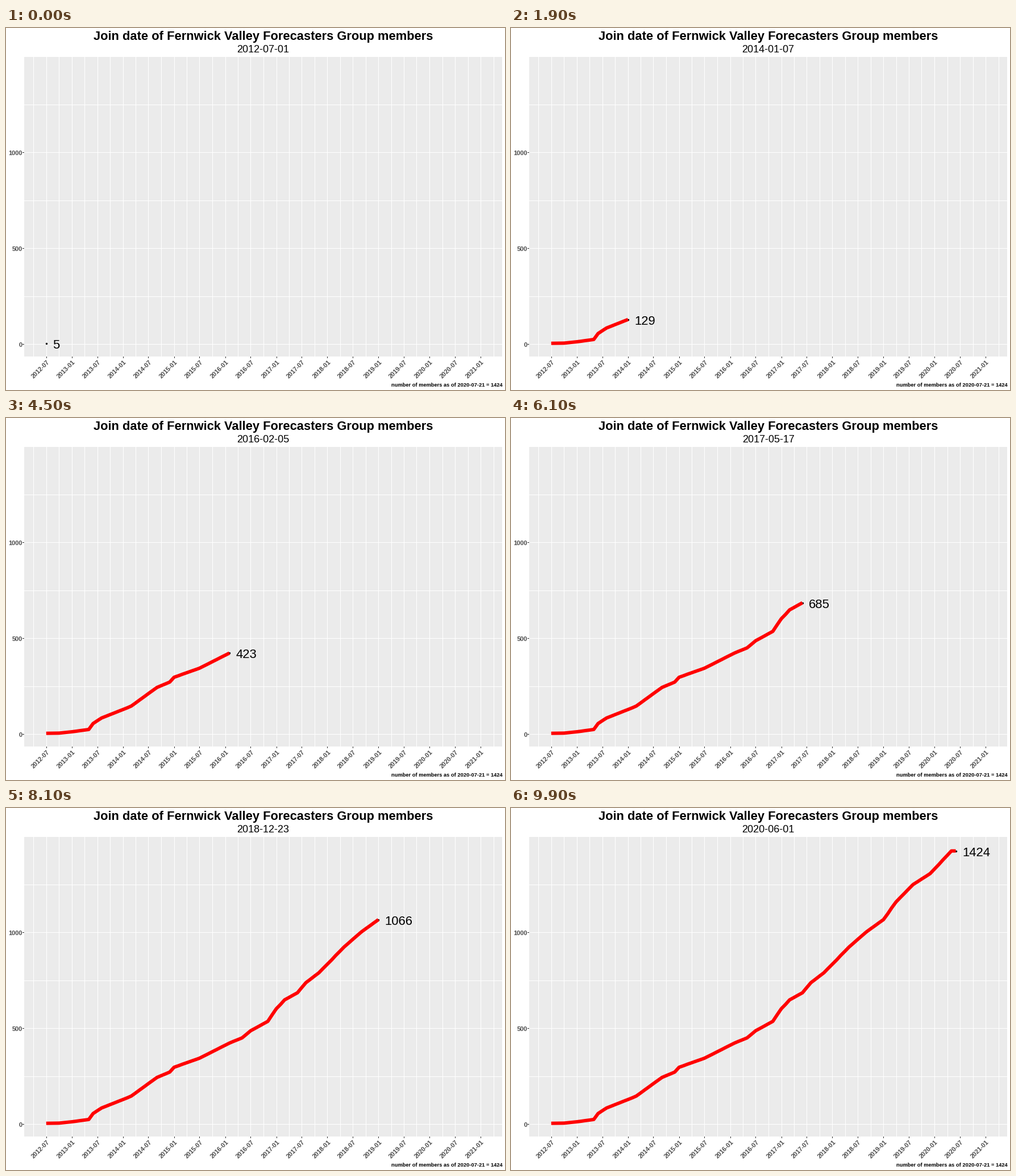
Animation of 878x638 px, one loop 10000 ms. Source, as a matplotlib script:

```python
import math

import matplotlib.pyplot as plt
import numpy as np
from matplotlib.animation import FuncAnimation
from matplotlib.patches import Rectangle

W, H, DPI = 878, 638, 64
FRAMES = 100
LEFT, RIGHT, TOP, BOTTOM = 32, 873, 51, 579
CENTRE = (LEFT + RIGHT) / 2

plt.rcParams["font.family"] = "Liberation Sans"

# Bends of the growth curve: months since the start, members
bends = [(0, 5), (3, 6), (6, 13), (10, 25), (11, 56), (13, 85), (18, 129),
         (20, 147), (26, 244), (29, 272), (30, 297), (36, 344), (43, 423),
         (46, 450), (48, 487), (52, 536), (54, 602), (56, 648), (59, 685),
         (61, 738), (64, 789), (70, 924), (74, 1002), (78, 1066),
         (81, 1158), (85, 1249), (89, 1306), (94, 1424), (95, 1424)]

start = np.datetime64("2012-07-01")


def days_of(months):
    return (months.astype("datetime64[D]") - start).astype(int)


def x_of(days):
    return 70.8 + 0.2461 * days


def y_of(value):
    return 557.4 - 0.3383 * value


months = np.arange("2012-07", "2020-07", dtype="datetime64[M]")
members = np.interp(np.arange(len(months)), *zip(*bends))
days = days_of(months)
span = int(days[-1])
# Each month snaps to its nearest frame; the gaps are interpolated
keys = np.round(days / span * (FRAMES - 1))

fig = plt.figure(figsize=(W / DPI, H / DPI), dpi=DPI, facecolor="white")
ax = fig.add_axes([0, 0, 1, 1])
ax.set_xlim(0, W)
ax.set_ylim(H, 0)
ax.axis("off")


def pt(px):
    return px * 72 / DPI


def text(x, y, s, px, **kw):
    kw.setdefault("va", "baseline")
    return ax.text(x, y, s, fontsize=pt(px), **kw)


def rule(xs, ys, color):
    ax.plot(xs, ys, color=color, lw=pt(1), solid_capstyle="butt",
            snap=False, zorder=2)


def pixel(v):
    return math.floor(v + 0.5) + 0.5


ax.add_patch(Rectangle((LEFT, TOP), RIGHT - LEFT, BOTTOM - TOP,
                       facecolor="#EBEBEB", linewidth=0, zorder=1))

for value in range(0, 1251, 250):
    y = pixel(y_of(value))
    rule([LEFT, RIGHT], [y, y], "white")
    if value % 500 == 0:
        rule([LEFT - 3, LEFT], [y, y], "#333333")
        text(28.7, y + 4.6, str(value), 11, weight="bold",
             color="#4D4D4D", ha="right")

breaks = np.arange("2012-07", "2021-02", 6, dtype="datetime64[M]")
ticks = x_of(days_of(breaks))
half = (ticks[1] - ticks[0]) / 2
middles = (ticks[1:] + ticks[:-1]) / 2
for x in [ticks[0] - half, *middles, ticks[-1] + half, *ticks]:
    rule([pixel(x)] * 2, [TOP, BOTTOM], "white")
for month, tick in zip(breaks, ticks):
    rule([pixel(tick)] * 2, [BOTTOM, BOTTOM + 3], "#333333")
    text(tick - 10, 602, str(month), 11, weight="bold", color="#4D4D4D",
         rotation=45, ha="center", va="center")

text(CENTRE, 21, "Join date of Fernwick Valley Forecasters Group members", 21.9,
     weight="bold", ha="center")
text(RIGHT + 0.3, 632.5, "number of members as of 2020-07-21 = 1424", 9.28,
     weight="bold", ha="right")
date = text(CENTRE, 43.3, "", 18, ha="center")

dot, = ax.plot([], [], "o", color="black", ms=pt(3.4), mew=0, zorder=3)
line, = ax.plot([], [], color="red", lw=pt(6), solid_capstyle="butt",
                solid_joinstyle="round", zorder=4)
label = text(0, 0, "", 22, ha="left", zorder=5)


def update(i):
    value = np.interp(i, keys, members)
    x, y = x_of(np.interp(i, keys, days)), y_of(value)
    past = keys < i
    line.set_data(np.append(x_of(days[past]), x),
                  np.append(y_of(members[past]), y))
    line.set_visible(i > 0)
    dot.set_data([x], [y])
    label.set_position((x + 11.5, y + 9))
    label.set_text(str(round(value)))
    date.set_text(str(start + i * span // (FRAMES - 1)))
    return line, dot, label, date


anim = FuncAnimation(fig, update, frames=FRAMES, interval=100,
                     repeat=True, repeat_delay=0)
plt.show()
```
